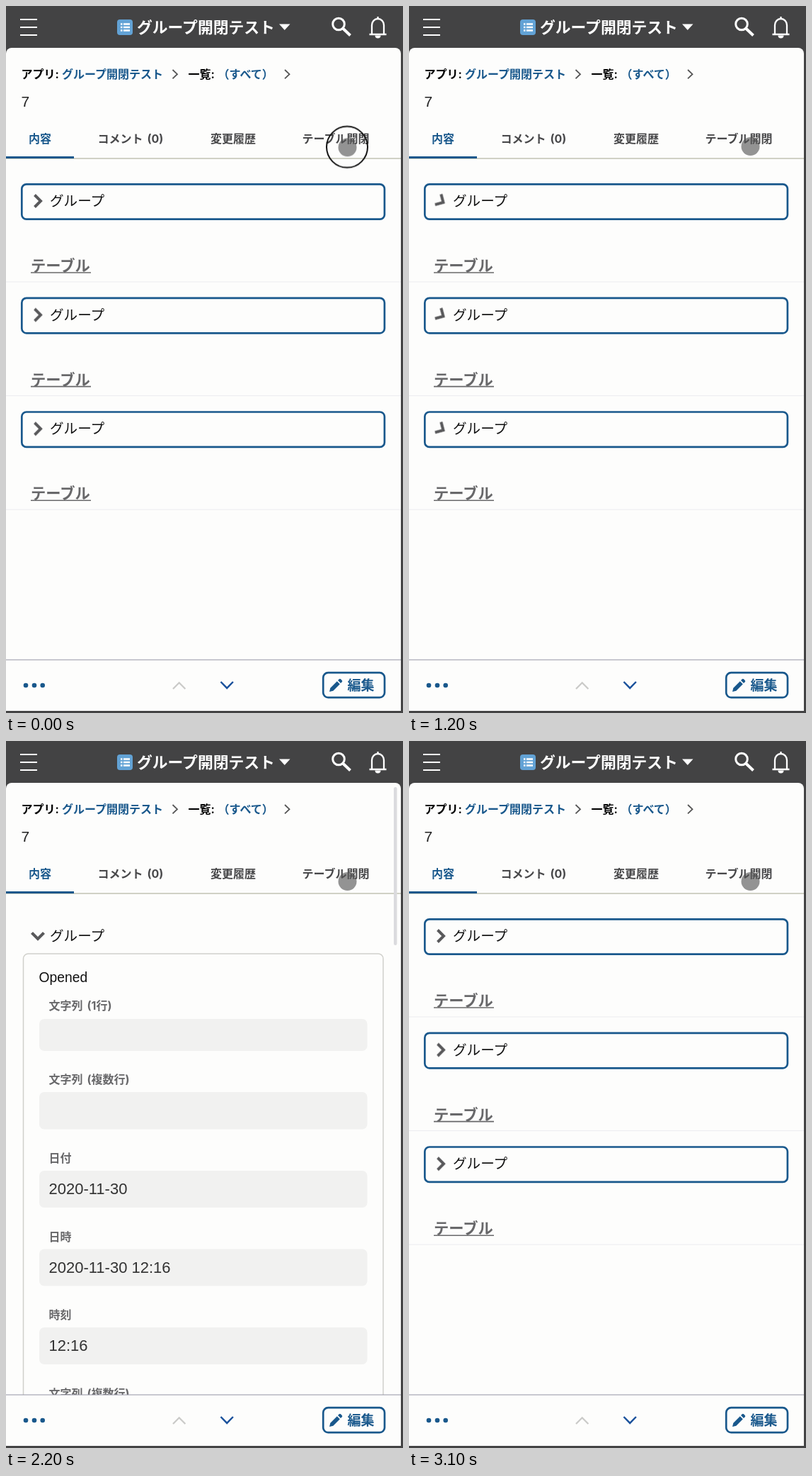
These frames come from a looping animation (561x997 px, 3.2 s). An HTML page:

```html
<!DOCTYPE html>
<html lang="ja">
<head>
<meta charset="utf-8">
<title>グループ開閉</title>
<style>
  html, body { margin: 0; width: 100%; height: 100%; overflow: hidden; background: #434344; }
  svg { display: block; width: 100vw; height: 100vh; }
  text { font-family: "Liberation Sans", "Noto Sans CJK JP", "Noto Sans CJK", sans-serif; white-space: pre; }
  .line { fill: none; }
  .bold { font-weight: 700; }
  .blue { fill: #19588c; }
  .small text, .label text { font: 700 16px Inter, "Noto Sans CJK JP", "Noto Sans CJK", sans-serif; word-spacing: 2.2px; }
  .label { fill: #68686a; }
  .value { font-size: 22px; fill: #333; }
  .group { font-size: 19.6px; fill: #111; }
  .box { fill: none; stroke: #19588c; stroke-width: 2.7; }
  .field { fill: #f1f1f0; }

  .open, .closed, .ring, .arrow, .pointer { animation: 3.2s step-end infinite; }
  .open { animation-name: open; }
  .closed { animation-name: closed; }
  .ring { animation-name: press; }
  .arrow { animation-name: turn; transform-origin: 45px 275px; fill: none; stroke: #59595b; stroke-width: 4; }
  .pointer { animation-name: drift; }

  @keyframes open {
    0%, 34.375%, 87.5%, 100% { opacity: 0; }
    6.25%, 56.25% { opacity: 1; }
  }
  @keyframes closed {
    0%, 34.375%, 87.5%, 100% { opacity: 1; }
    6.25%, 56.25% { opacity: 0; }
  }
  @keyframes press {
    0%, 28.125%, 50%, 84.375% { opacity: 1; }
    6.25%, 34.375%, 56.25%, 87.5%, 100% { opacity: 0; }
  }
  @keyframes turn {
    0%, 6.25%, 40.625%, 93.75%, 100% { transform: rotate(0deg); }
    9.375%, 37.5%, 56.25%, 90.625% { transform: rotate(30deg); }
    12.5%, 34.375%, 59.375%, 87.5% { transform: rotate(90deg); }
  }
  @keyframes drift {
    0% { transform: translateY(1.3px); }
    21.875%, 100% { transform: translateY(0); }
  }
</style>
</head>
<body>
<svg viewBox="0 0 561 997" preserveAspectRatio="none">
  <defs>
    <g id="row">
      <rect class="box" x="22.3" y="251.3" width="512.6" height="49.4" rx="6.5"/>
      <text class="group" x="62" y="282">グループ</text>
      <text class="bold" x="35" y="374" font-size="21.3" fill="#68686a">テーブル</text>
      <path d="M35 376H120" stroke="#68686a" stroke-width="1.6"/>
      <path d="M0 389H558" stroke="#ececf0"/>
    </g>
    <path id="crumb" class="line" d="M235.5 90l6.5 6.2-6.5 6.2" stroke="#555" stroke-width="1.8"/>
  </defs>

  <rect width="561" height="997" fill="#434344"/>
  <path d="M0 994V67a8 8 0 0 1 8-8H550a8 8 0 0 1 8 8V994z" fill="#fdfdfc"/>

  <!-- header -->
  <g class="line" stroke="#fff">
    <path d="M20 19H44M20 30H44M20 41H44" stroke-width="2.2"/>
    <circle cx="470" cy="25.5" r="8.3" stroke-width="3"/>
    <path d="M476 31.5l10.5 10" stroke-width="4"/>
    <path d="M513.5 40H537.5M517 40V27a8.5 9 0 0 1 17 0V40M525.5 18V15" stroke-width="2.3"/>
  </g>
  <path d="M521.5 41.5h8a4 4 0 0 1-8 0z" fill="#fff"/>
  <rect x="157" y="19" width="22" height="22" rx="4" fill="#62a2d5"/>
  <path d="M162 25.5h2.5M162 30h2.5M162 34.5h2.5M166 25.5h9M166 30h9M166 34.5h9" stroke="#fff" stroke-width="2.3"/>
  <text class="bold" x="185" y="38" font-size="21.8" fill="#fff">グループ開閉テスト</text>
  <path d="M386 25.5H401.5L393.7 34z" fill="#fff"/>

  <!-- breadcrumb -->
  <g class="small">
    <text x="21.5" y="102">アプリ:</text>
    <text class="blue" x="79" y="102">グループ開閉テスト</text>
    <text x="257.5" y="102">一覧:</text>
    <text class="blue" x="299.5" y="102">（すべて）</text>
  </g>
  <use href="#crumb"/>
  <use href="#crumb" x="158.5"/>
  <text x="21.5" y="141.5" font-size="21" fill="#222">7</text>

  <!-- tabs -->
  <g class="small" fill="#48484a">
    <text class="blue" x="32" y="193">内容</text>
    <text x="129.5" y="193">コメント (0)</text>
    <text x="289" y="193">変更履歴</text>
    <text x="418.5" y="193">テーブル開閉</text>
  </g>
  <path d="M0 215H558" stroke="#a3a690" stroke-width="1.2"/>
  <rect class="blue" y="212" width="96" height="3"/>

  <!-- groups -->
  <path class="arrow" d="M40.5 266.5l8.5 8.5-8.5 8.5"/>
  <g class="closed">
    <use href="#row"/>
    <use href="#row" y="160.6"/>
    <use href="#row" y="321.2"/>
    <g transform="translate(0 160.6)"><path class="arrow" d="M40.5 266.5l8.5 8.5-8.5 8.5"/></g>
    <g transform="translate(0 321.2)"><path class="arrow" d="M40.5 266.5l8.5 8.5-8.5 8.5"/></g>
  </g>
  <g class="open">
    <text class="group" x="62" y="282">グループ</text>
    <path class="line" d="M24.5 930V307a7 7 0 0 1 7-7H526a7 7 0 0 1 7 7V930" stroke="#d0d0cb" stroke-width="1.5"/>
    <text x="46.5" y="340.3" font-size="19.3" fill="#111">Opened</text>
    <g class="label">
      <text x="60.5" y="379">文字列 (1行)</text>
      <text x="60.5" y="483">文字列 (複数行)</text>
      <text x="60.5" y="594">日付</text>
      <text x="60.5" y="704.5">日時</text>
      <text x="60.5" y="815">時刻</text>
      <text x="60.5" y="925.5">文字列 (複数行)</text>
    </g>
    <g class="field">
      <rect x="47" y="392" width="463.5" height="45" rx="7"/>
      <rect x="47" y="495" width="463.5" height="52.5" rx="7"/>
      <rect x="47" y="606" width="463.5" height="52" rx="7"/>
      <rect x="47" y="716.5" width="463.5" height="52" rx="7"/>
      <rect x="47" y="827" width="463.5" height="52" rx="7"/>
    </g>
    <g class="value">
      <text x="60.5" y="639">2020-11-30</text>
      <text x="60.5" y="749.5">2020-11-30 12:16</text>
      <text x="60.5" y="860">12:16</text>
    </g>
    <rect x="548" y="65" width="4.5" height="223" rx="2.2" fill="#dbdbde"/>
  </g>

  <!-- footer -->
  <rect y="922" width="558" height="72" fill="#fdfdfc"/>
  <path d="M0 922H558" stroke="#9393a4" stroke-width="1.2"/>
  <g class="blue">
    <circle cx="28" cy="958" r="3.3"/>
    <circle cx="40" cy="958" r="3.3"/>
    <circle cx="51.7" cy="958" r="3.3"/>
    <path d="M457 967l1.3-5.2 9.5-9.5 4 4-9.5 9.5zM469 951l1.7-1.7q1.2-1.2 2.4 0l1.6 1.6q1.2 1.2 0 2.4l-1.7 1.7z"/>
    <text class="bold" x="482.5" y="965" font-size="19">編集</text>
  </g>
  <path class="line" d="M236 963l8.7-8.7 8.7 8.7" stroke="#cacac8" stroke-width="2.3"/>
  <path class="line" d="M303.5 953l8.7 8.9 8.7-8.9" stroke="#1b529c" stroke-width="2.5"/>
  <rect class="box" x="448.2" y="940.2" width="86.8" height="35" rx="7"/>

  <g class="pointer">
    <circle cx="482.5" cy="198" r="13" fill="#555" fill-opacity=".63"/>
    <circle class="line ring" cx="482" cy="197.6" r="29" stroke="#111" stroke-width="2"/>
  </g>
</svg>
</body>
</html>
```
